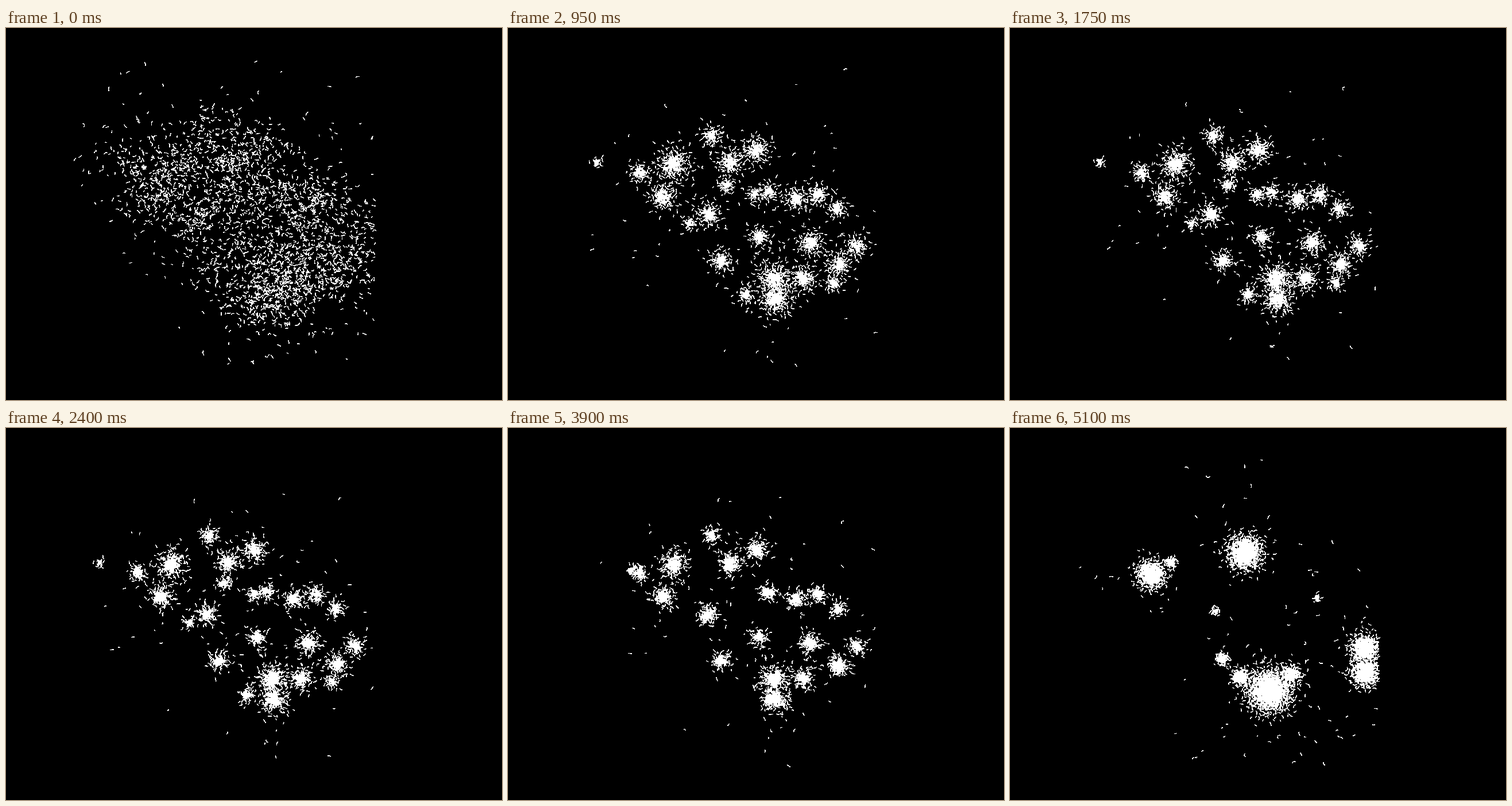
These frames come from a looping animation (864x648 px, 5.15 s). An HTML page with a canvas:

```html
<!DOCTYPE html>
<html lang="en">
<head>
<meta charset="utf-8">
<title>Gathering particles</title>
<style>
  html, body { margin: 0; width: 100%; height: 100%; overflow: hidden; background: #000; }
  canvas { display: block; }
</style>
</head>
<body>
<canvas id="stage" width="864" height="648"></canvas>
<script>
const LOOP = 5150, STEP = 50, COUNT = 2500;
const GATHERED = 950, SETTLED = 3900, MERGED = 5100;
const W = 864, H = 648, GOLDEN = Math.PI * (3 - Math.sqrt(5));
const ctx = document.getElementById('stage').getContext('2d', { willReadFrequently: true });

// Gathering points: x, y, share of the worms
const GROUPS = [
  [355, 188, 72], [230, 252, 72], [288, 237, 190], [270, 294, 125], [387, 234, 130],
  [433, 213, 125], [380, 274, 50], [350, 325, 100], [155, 234, 18], [316, 340, 34],
  [430, 290, 45], [455, 286, 62], [502, 298, 95], [540, 290, 80], [574, 315, 66],
  [438, 364, 72], [371, 406, 90], [464, 437, 210], [466, 473, 180], [515, 436, 115],
  [527, 374, 120], [608, 380, 85], [577, 412, 100], [567, 445, 50], [414, 465, 50]
];
const FINAL = [
  [409, 217, 390], [246, 255, 270], [281, 234, 40], [452, 458, 620], [490, 430, 110],
  [402, 434, 90], [370, 402, 50], [618, 383, 260], [618, 426, 260], [535, 297, 14], [358, 320, 16]
];

let seed = 90417;
function rnd() {
  seed = (seed + 0x6D2B79F5) | 0;
  let n = Math.imul(seed ^ (seed >>> 15), 1 | seed);
  n = (n + Math.imul(n ^ (n >>> 7), 61 | n)) ^ n;
  return ((n ^ (n >>> 14)) >>> 0) / 4294967296;
}
const gauss = () => Math.sqrt(-2 * Math.log(1 - rnd())) * Math.cos(2 * Math.PI * rnd());
const mix = (a, b, k) => a + (b - a) * k;
const part = (t, a, b) => Math.min(1, Math.max(0, (t - a) / (b - a)));
const smooth = k => k * k * (3 - 2 * k);
const fold = (v, lo, hi) => v < lo ? 2 * lo - v : v > hi ? 2 * hi - v : v;
const dist = (a, b) => (a.x - b.x) ** 2 + (a.y - b.y) ** 2;

// Fill each point with an even spiral, dense inside and ragged outside, plus a few strays
function spread(points, scale, power, core) {
  const total = points.reduce((sum, p) => sum + p[2], 0);
  const out = [];
  let sum = 0;
  points.forEach(([x, y, share], id) => {
    const begin = out.length;
    sum += share;
    const n = Math.round(COUNT * sum / total) - begin;
    for (let i = 0; i < n; i++) {
      const k = (i + 0.5) / n, stray = rnd() < 0.055;
      const r = scale * Math.sqrt(share) * (-Math.log(1 - k)) ** power + (stray ? 200 * rnd() ** 2 : 0);
      const dx = r * Math.cos(i * GOLDEN) + gauss(), dy = r * Math.sin(i * GOLDEN) + gauss();
      out.push({ x: x + dx, y: y + dy, dx, dy, id, fat: stray ? 0 : Math.max(0, 1 - k / core) });
    }
  });
  return out;
}

// Reorder `to` by random swaps so that every journey stays short
function pair(from, to) {
  for (let n = 0; n < 400000; n++) {
    const i = rnd() * COUNT | 0, j = rnd() * COUNT | 0;
    const now = dist(from[i], to[i]) + dist(from[j], to[j]);
    if (dist(from[i], to[j]) + dist(from[j], to[i]) < now) [to[i], to[j]] = [to[j], to[i]];
  }
}

// Small groups are slowly drawn to the nearest larger one
const pull = GROUPS.map(([x, y, share]) => {
  if (share > 55) return [0, 0];
  const far = g => Math.hypot(g[0] - x, g[1] - y);
  const near = GROUPS.filter(g => g[2] > share).sort((a, b) => far(a) - far(b))[0];
  return [near[0] - x, near[1] - y];
});

function grouped(g, t) {
  const p = part(t, GATHERED, SETTLED), size = 1 - 0.25 * Math.sqrt(p);
  const turn = 0.5 * p * g.spin, c = Math.cos(turn), s = Math.sin(turn);
  const [px, py] = pull[g.id], drift = 0.8 * p ** 3;
  return {
    x: g.x - g.dx + px * drift + (g.dx * c - g.dy * s) * size,
    y: g.y - g.dy + py * drift + (g.dx * s + g.dy * c) * size
  };
}

const mid = spread(GROUPS, 1.55, 0.62, 0.5);
mid.forEach(g => { g.spin = gauss(); });
const last = spread(FINAL, 1.15, 0.52, 0.95);
pair(mid.map(g => grouped(g, SETTLED)), last);

const worms = mid.map((group, i) => {
  const loose = 21 * Math.min(5, rnd() ** -0.4);
  return {
    group, to: last[i],
    from: { x: group.x + loose * gauss(), y: group.y + loose * gauss() },
    angle: Math.atan2(group.dy, group.dx) + 0.7 * gauss(),
    half: mix(1.6, 3.9, rnd()),
    bend: 2 * gauss(),
    delay: rnd(),
    phase: 2 * Math.PI * rnd(),
    rate: mix(0.004, 0.009, rnd())
  };
});

function pose(w, t) {
  const home = grouped(w.group, t);
  const leave = SETTLED + 0.4 * w.delay * (MERGED - SETTLED);
  const gather = 1 - (1 - part(t, 0, GATHERED)) ** 1.6;
  const merge = smooth(part(t, leave, leave + 0.6 * (MERGED - SETTLED)));
  const along = key => mix(mix(w.from[key], home[key], gather), w.to[key], merge);
  const a = w.phase + t * w.rate;
  return {
    x: fold(along('x') + 1.5 * Math.cos(a), 119, 642),
    y: fold(along('y') + 1.5 * Math.sin(1.3 * a), 52, 595),
    width: 1.5 + 2.2 * mix(w.group.fat * gather, w.to.fat, merge)
  };
}

function draw(t) {
  ctx.fillStyle = '#000';
  ctx.fillRect(0, 0, W, H);
  ctx.strokeStyle = '#fff';
  for (const w of worms) {
    const { x, y, width } = pose(w, t);
    const wave = Math.sin(w.phase + t * w.rate * 1.4);
    const a = w.angle + 0.5 * wave, b = w.bend + wave;
    const c = Math.cos(a), s = Math.sin(a);
    ctx.lineWidth = width;
    ctx.beginPath();
    ctx.moveTo(x - w.half * c, y - w.half * s);
    ctx.quadraticCurveTo(x - b * s, y + b * c, x + w.half * c, y + w.half * s);
    ctx.stroke();
  }
  // Pure black and white, with hard pixel edges
  const image = ctx.getImageData(0, 0, W, H);
  const px = new Uint32Array(image.data.buffer);
  for (let i = 0; i < px.length; i++) px[i] = (px[i] & 255) > 110 ? 0xffffffff : 0xff000000;
  ctx.putImageData(image, 0, 0);
}

const begin = performance.now();
let shown = -1;
function tick() {
  const t = (performance.now() - begin) % LOOP;
  const step = t < 2 * STEP ? 0 : Math.floor(t / STEP);
  if (step !== shown) draw(step * STEP);
  shown = step;
  requestAnimationFrame(tick);
}
tick();
</script>
</body>
</html>
```
